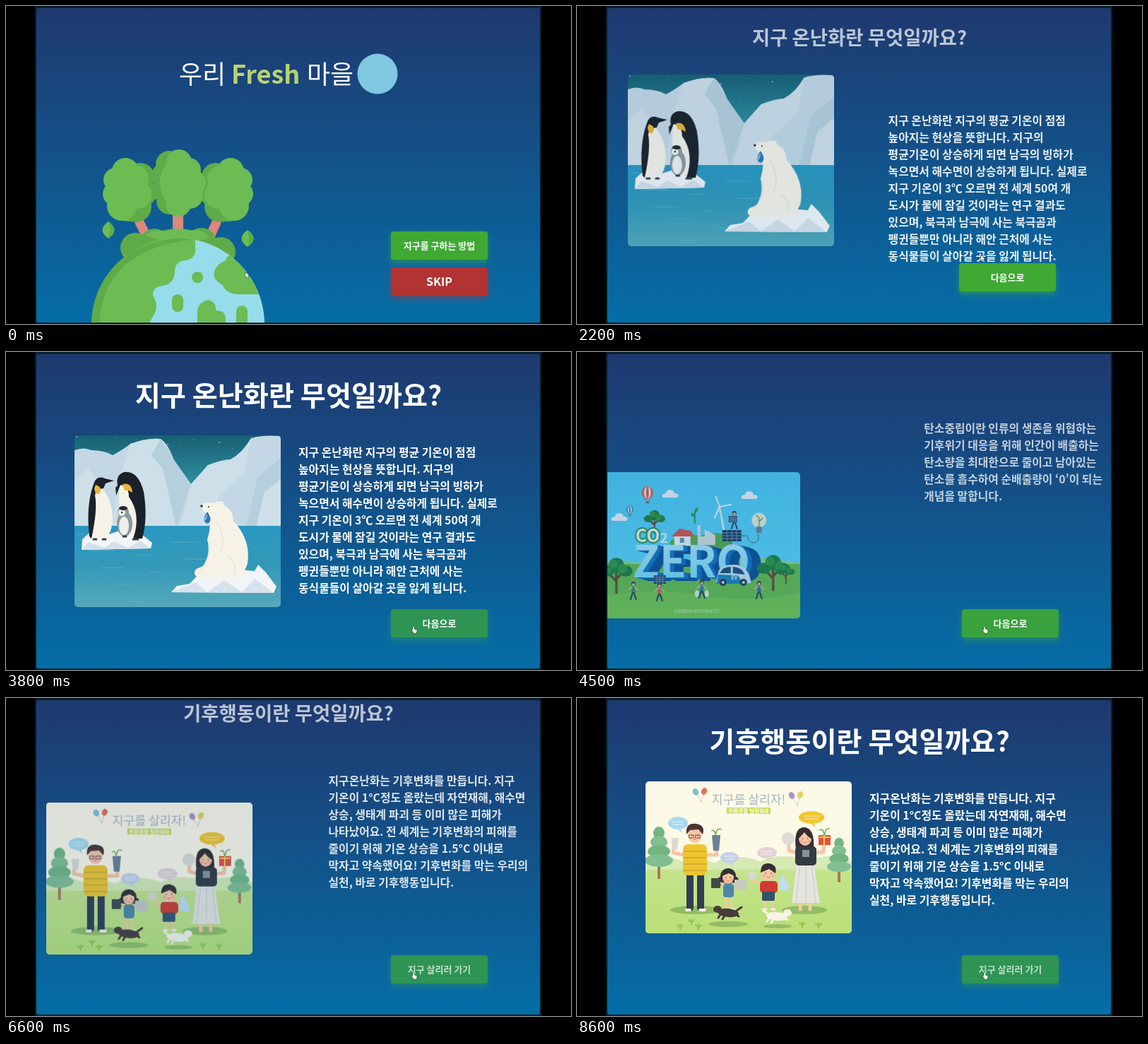
An HTML page with a canvas for the animation above (8.7 s loop, 800 by 450 pixels).

```html
<!DOCTYPE html>
<html lang="ko">
<head>
<meta charset="utf-8">
<title>지구 온난화 이야기</title>
<style>
html, body { margin: 0; width: 100%; height: 100%; overflow: hidden; background: #000; }
canvas { display: block; width: 800px; height: 450px; }
</style>
</head>
<body>
<canvas id="stage" width="800" height="450"></canvas>
<script>
const LOOP = 8700;
const FONT = '"Noto Sans CJK KR", "Noto Sans CJK", "Noto Sans", sans-serif';
const stage = document.getElementById('stage').getContext('2d');
let g = stage;

// Drawing helpers
function shape(color, d) { g.fillStyle = color; g.fill(new Path2D(d)); }
function line(color, width, d) {
  g.strokeStyle = color; g.lineWidth = width;
  g.lineCap = g.lineJoin = 'round';
  g.stroke(new Path2D(d));
}
function dot(color, x, y, rx, ry = rx, turn = 0) {
  g.fillStyle = color;
  g.beginPath(); g.ellipse(x, y, rx, ry, turn, 0, 7); g.fill();
}
function dots(color, list) { for (const d of list) dot(color, ...d); }
function box(color, x, y, w, h, r = 0) {
  g.fillStyle = color;
  g.beginPath(); g.roundRect(x, y, w, h, r); g.fill();
}
function text(str, x, y, size, color = '#fff', align = 'left', weight = 700) {
  g.font = `${weight} ${size}px ${FONT}`;
  g.textAlign = align; g.fillStyle = color;
  g.fillText(str, x, y);
}
function fade(y0, y1, ...colors) {
  const f = g.createLinearGradient(0, y0, 0, y1);
  colors.forEach((c, i) => f.addColorStop(i / (colors.length - 1), c));
  return f;
}

// Timing helpers
const clamp = v => Math.min(1, Math.max(0, v));
const mix = (a, b, k) => a + (b - a) * k;
function ease(p) {
  p = clamp(p);
  let lo = 0, hi = 1, u = p;
  for (let i = 0; i < 24; i++) {
    u = (lo + hi) / 2;
    if (0.75 * u * (1 - u) + u ** 3 < p) lo = u; else hi = u;
  }
  return 0.3 * u * (1 - u) ** 2 + 3 * u * u * (1 - u) + u ** 3;
}
const ramp = (t, start, length) => ease((t - start) / length);

// Home page
function crown(x, y, side) {
  const dark = '#5fab49', light = '#6cbc53';
  dots(dark, [[x + 16 * side, y - 19, 20], [x + 21 * side, y + 4, 18], [x + 10 * side, y + 23, 22], [x, y + 18, 26]]);
  dots(light, [[x - 5 * side, y - 27, 19], [x - 19 * side, y - 15, 17], [x - 20 * side, y + 5, 17],
    [x - 10 * side, y + 22, 21], [x + 10 * side, y - 17, 18], [x + 12 * side, y + 6, 20], [x - 3 * side, y, 26]]);
}
function leaf(x, y) {
  shape('#6cbc53', `M${x},${y - 12} Q${x + 17},${y} ${x},${y + 12} Q${x - 17},${y} ${x},${y - 12}Z`);
  shape('#5fab49', `M${x},${y - 12} Q${x + 17},${y} ${x},${y + 12} Q${x + 4},${y} ${x},${y - 12}Z`);
}
function planet() {
  line('#dd877d', 15, 'M243.500,298 V318');
  line('#dd877d', 13, 'M189,306 L200,328 M298,306 L288,328');
  crown(174, 261, 1);
  crown(313, 261, -1);
  dots('#5fab49', [[231, 224, 19], [224, 240, 18], [224, 260, 18], [232, 276, 19]]);
  dots('#6cbc53', [[245, 221, 18], [259, 232, 17], [265, 250, 18], [260, 268, 19], [244, 280, 18], [243, 250, 25, 34]]);
  dots('#5fab49', [[183, 342, 21], [210, 335, 20], [277, 335, 21], [304, 348, 21], [243, 338, 44, 23]]);
  shape('#6cbc53', 'M198,325 Q210,315 227,319 Q243,312 260,318 Q278,314 288,328 L243,340Z');
  g.save();
  g.beginPath(); g.arc(243.5, 451, 122.5, 0, 7); g.clip();
  box('#6cbc53', 120, 325, 248, 124);
  shape('#5fab49', 'M121,451 Q124,344 243,328 L264,331 Q138,344 132,451Z');
  shape('#97dcea', 'M268,328 V347 Q267,358 254,360 Q240,361 239,374 Q239,393 222,396 Q207,397 208,410 Q216,422 211,434 L202,450 H370 V328Z');
  shape('#6cbc53', 'M318,353 Q312,354 311,360 Q292,368 295,384 Q300,392 306,394 Q312,408 330,408 H370 V350Z');
  dot('#6cbc53', 271, 384, 8);
  box('#6cbc53', 235, 408, 16, 25, 8);
  shape('#6cbc53', 'M271,450 V430 Q274,418 286,416 Q298,418 297,431 Q310,430 311,442 V450Z');
  box('#6cbc53', 326, 424, 16, 34, 8);
  g.restore();
  leaf(145, 317);
  leaf(342, 329);
}
function home(t) {
  text('우리', 245, 110, 36, '#fff', 'left', 500);
  text('Fresh', 319, 110, 36, '#b9d36e', 'left', 900);
  text('마을', 426, 110, 36, '#fff', 'left', 500);
  dot('#80c8df', 526, 96, 28.5);
  planet();
  button('지구를 구하는 방법', 319, '#3fa934', mix(1, 0.55, ramp(t, 950, 200)));
  button('SKIP', 370, '#b13333', 1, { size: 16 });
}

// Picture: penguins and bear
function polar() {
  box(fade(118, 190, '#176074', '#2f919e'), 97, 118, 292, 130);
  for (let i = 0; i < 34; i++)
    dot('#8fc9cf', 100 + (i * 83) % 286, 120 + (i * 37) % 58, i % 5 ? 0.5 : 0.9);
  shape('#c3d8e4', 'M97,139 Q110,134 121,139 Q139,139 151,146 Q166,138 176,130 Q200,121 219,123 Q229,129 238,153 L262,187 L286,160 Q306,152 318,152 Q335,143 347,122 Q362,117 389,119 V248 H97Z');
  shape('#cddfe9', 'M176,130 Q200,121 219,123 L206,146 L222,165 L241,248 H150 L160,180Z M347,122 L338,170 L302,205 L286,248 H246 L262,187 L286,160 L318,152 Q335,143 347,122Z');
  shape('#b6cfdc', 'M219,123 L206,146 L222,165 L241,248 L262,187 L238,153Z M389,150 L356,177 L340,248 H389Z');
  shape('#d0e0e9', 'M97,184 L117,165 L137,190 L151,248 H97Z M389,180 L366,198 L354,248 H389Z');
  box(fade(246, 361, '#2a97c1', '#3499b8', '#56a9b9'), 97, 246, 292, 115);
  for (let i = 0; i < 17; i++) {
    const x = 100 + (i * 67) % 250, y = 257 + i * 6;
    line('#59b0c8', 0.8, `M${x},${y} h${12 + i * 13 % 28}`);
  }
  floe('M108,265 L120,254 L139,260 L161,253 L191,257 L207,270 L205,278 L107,280Z', 'M107,280 L117,269 L139,277 L153,268 L173,277 L190,267 L205,278Z');
  floe('M234,340 L242,331 L260,328 L275,312 L316,307 L352,310 L357,301 L368,312 L383,332 L379,341Z', 'M234,340 L269,326 L285,340 L309,323 L334,340 L352,321 L379,341Z');
  penguins();
  shape('#f6f2e7', 'M276,218 Q282,211 292,214 Q302,209 309,217 Q321,223 322,239 Q347,266 342,299 Q338,318 308,319 L274,319 Q263,316 269,308 L280,302 Q290,285 285,265 Q291,247 287,231 L279,225Z');
  dots('#f6f2e7', [[304, 215, 4], [276, 312, 9, 7], [320, 312, 21, 8]]);
  line('#e0dbd0', 1, 'M298,240 Q313,264 304,283 M289,269 Q290,291 275,309 M313,289 Q327,293 324,313');
  dots('#252d33', [[277, 218, 1.7], [287, 219, 1]]);
  shape('#2e76b5', 'M285,226 Q294,239 285,243 Q276,239 285,226Z');
  shape('#7db9df', 'M285,229 Q285,238 281,239 Q279,237 285,229Z');
}
function floe(top, shade) {
  shape('#f1f4f8', top);
  shape('#d6e2eb', shade);
}
function penguins() {
  shape('#f5f2e8', 'M130,187 Q149,203 151,232 Q151,258 139,264 L121,264 Q112,235 130,187Z');
  shape('#1b2128', 'M124,187 Q128,174 140,179 L153,182 L141,186 L138,193 Q127,193 126,203 Q130,222 121,264 L118,261 Q113,217 124,187Z');
  shape('#e9b536', 'M127,188 Q138,192 132,200 Q127,204 125,193Z');
  shape('#f5f2e8', 'M161,187 Q158,218 165,259 L182,263 Q192,233 181,197Z');
  shape('#1b2128', 'M158,189 Q155,174 167,170 Q187,167 195,198 Q201,235 193,264 L180,264 Q192,230 174,205 Q174,190 162,188 L156,203 L155,192Z');
  shape('#e9b536', 'M165,187 Q178,184 179,199 Q172,194 168,196Z');
  dots('#8d979e', [[168, 243, 11, 18], [166, 226, 8, 7]]);
  dots('#eef0ec', [[167, 246, 7, 13], [164, 227, 5]]);
  dots('#20282e', [[166, 221, 6, 3], [164, 227, 1.2]]);
  line('#3a4248', 3, 'M124,265 h4 M137,265 h4 M166,261 h4 M180,265 h7');
}

// Picture: city without carbon
function cloud(x, y) {
  dots('#fff', [[x - 6, y + 1, 5, 3], [x, y - 2, 6, 5], [x + 7, y + 1, 5, 3]]);
  box('#fff', x - 11, y, 22, 4, 2);
}
function tree(x, y, s) {
  line('#6d4629', 3 * s, `M${x},${y} v${28 * s} M${x},${y + 13 * s} l${-9 * s},${-9 * s} M${x},${y + 10 * s} l${8 * s},${-8 * s}`);
  dots('#23803a', [[x, y - 7 * s, 10 * s], [x - 12 * s, y, 9 * s, 7 * s], [x + 12 * s, y, 9 * s, 7 * s]]);
  dots('#359a3c', [[x - 4 * s, y - 9 * s, 6 * s], [x + 8 * s, y - 3 * s, 6 * s]]);
}
function balloon(x, y, r, color) {
  dot(color, x, y, r, r * 1.15);
  dot('#fff', x, y, r * 0.6, r * 1.1);
  dot(color, x, y, r * 0.25, r * 1.15);
  line('#7c6653', 0.6, `M${x - r * .5},${y + r} l${r * .3},${r * .6} M${x + r * .5},${y + r} l${-r * .3},${r * .6}`);
  box('#9b6548', x - r * .25, y + r * 1.5, r * .5, r * .4);
}
function walker(x, y, shirt) {
  dot('#36313a', x, y - 11, 3);
  dot('#f3bd98', x, y - 10, 2);
  line(shirt, 5, `M${x},${y - 5} v5`);
  line('#f3bd98', 1.5, `M${x - 2},${y - 6} l-5,3 M${x + 2},${y - 6} l5,4`);
  line('#27344a', 2, `M${x - 1},${y + 2} l-3,9 M${x + 1},${y + 2} l3,9`);
}
function panel(x, y, w, h) {
  box('#1f3d5c', x, y, w, h);
  for (let i = 1; i < 4; i++)
    line('#a7cee2', 0.6, `M${x + w * i / 4},${y} v${h} M${x},${y + h * i / 4} h${w}`);
}
function city() {
  box(fade(118, 248, '#50d5ff', '#62dcff'), 97, 118, 292, 207);
  shape('#8fdc9c', 'M97,249 L126,241 L160,246 L190,236 L240,244 L316,236 L389,246 V280 H97Z');
  box('#6ec042', 97, 248, 292, 77);
  shape('#7ccb45', 'M97,297 Q160,280 244,292 T389,288 V325 H97Z');
  cloud(205, 150); cloud(317, 152); cloud(133, 183);
  balloon(173, 147, 8, '#ef5b43');
  balloon(148, 171, 5, '#368cba');
  tree(183, 184, 0.72);
  line('#f5fafa', 2.5, 'M275,167 L282,205');
  line('#fff', 2, 'M275,167 L270,153 M275,167 L291,164 M275,167 L268,183');
  dots('#5cb247', [[235, 218, 30, 11], [268, 217, 25, 13]]);
  shape('#e4eae7', 'M244,221 V193 h4 v16 h6 v-10 l15,8 v14Z');
  line('#37963f', 2, 'M240,190 V176');
  dots('#37963f', [[242, 172, 2, 4, .4], [238, 179, 2, 4, -.7]]);
  box('#fff', 211, 208, 23, 14);
  shape('#e65642', 'M207,209 L218,198 L234,201 L240,209Z');
  box('#6e9ab1', 219, 211, 6, 7);
  panel(279, 200, 27, 16);
  line('#466578', 1, 'M292,216 v6 M306,208 h8 q2,10 10,10 q8,0 6,-12');
  walker(296, 187, '#3c78ba');
  panel(288, 180, 12, 9);
  dot('#fbf9d9', 331, 186, 10);
  line('#fff', 1, 'M331,176 a10,10 0 1,1 -.1,0');
  line('#61ad56', 1.5, 'M331,195 V183 l-4,-4 M331,188 l5,-5');
  box('#75868d', 327, 195, 8, 9, 2);
  for (let i = 16; i > 0; i--) text('ZERO', 152 + i * 1.2, 267 + i * .3, 62, i > 5 ? '#0f4f94' : '#1574c4', 'left', 900);
  text('ZERO', 152, 267, 62, fade(222, 268, '#b9f1ff', '#84e4ff'), 'left', 900);
  g.font = `900 25px ${FONT}`;
  g.textAlign = 'left'; g.strokeStyle = '#2f9a3f'; g.lineWidth = 4;
  g.strokeText('CO', 156, 217);
  text('CO', 156, 217, 25, '#fff', 'left', 900);
  text('2', 191, 218, 18, '#fff', 'left', 900);
  tree(129, 258, 1.1); tree(351, 254, 1.1);
  tree(113, 259, .6); tree(369, 259, .6);
  shape('#d8eef5', 'M270,273 L274,257 Q279,248 299,249 Q311,251 317,263 L320,274 L314,276 H272Z');
  shape('#1f4f78', 'M277,259 Q279,252 291,252 V261 H275Z M294,252 Q306,252 311,263 L294,261Z');
  shape('#2383bd', 'M273,263 L301,264 L309,276 H271Z');
  dots('#263748', [[280, 274, 5], [309, 274, 5]]);
  dots('#dcebef', [[280, 274, 2], [309, 274, 2]]);
  text('EV', 296, 270, 7, '#fff', 'center');
  walker(153, 287, '#3a8c58'); walker(190, 289, '#e35f4b');
  walker(250, 285, '#337eac'); walker(331, 286, '#4a6b9e');
  panel(182, 264, 17, 12);
  dots('#edf5ec', [[243, 290, 3, 5], [257, 290, 3, 5]]);
  text('CARBON NEUTRALITY', 243, 317, 6.3, '#e8f6cc', 'center', 400);
}

// Picture: family
function pine(x, y, s) {
  box('#a77c59', x - 2, y + 26 * s, 4, 23 * s);
  for (let i = 0; i < 4; i++) dot(i % 2 ? '#80bf91' : '#72b583', x, y + i * 13 * s - 16 * s, (8 + i * 4) * s, 9 * s);
}
function bubble(x, y, rx, ry, color) {
  dot(color, x, y, rx, ry);
  shape(color, `M${x - 3},${y + ry - 2} l6,0 l3,7Z`);
  line('#ffffffaa', 1, `M${x - rx * .6},${y - 2} h${rx * 1.2} M${x - rx * .5},${y + 2} h${rx}`);
}
function face(x, y, r) {
  dot('#f7c6a5', x, y, r, r * 1.1);
  dots('#4b3c3c', [[x - r * .4, y, .8], [x + r * .4, y, .8]]);
  dots('#f0a28e', [[x - r * .6, y + r * .4, 1.5], [x + r * .6, y + r * .4, 1.5]]);
  line('#bd5c50', .7, `M${x - 2},${y + r * .55} q2,2 4,0`);
}
function dog(x, y, color, dir) {
  line(color, 3, `M${x - 9},${y} l-5,7 M${x + 8},${y} l7,5 M${x - 4},${y + 2} l-4,7 M${x - 12 * dir},${y - 3} l${-7 * dir},-5`);
  dot(color, x, y, 15, 6, .1);
  dot(color, x + 15 * dir, y - 5, 6, 5);
}
function party(x, y, left, right) {
  line('#a9a592', .5, `M${x},${y} l8,14 M${x + 12},${y} l-4,14`);
  dot(left, x, y, 4, 5, -.5);
  dot(right, x + 12, y - 1, 4, 5, .4);
}
function family() {
  box('#fdf9e7', 97, 118, 292, 215);
  dots('#d6eab4', [[123, 244, 35, 19], [171, 244, 36, 15], [229, 243, 40, 18], [293, 243, 42, 19], [358, 244, 40, 20]]);
  box(fade(243, 333, '#c4e48c', '#b9df78'), 97, 243, 292, 90);
  pine(116, 207, 1); pine(371, 219, .85);
  party(168, 133, '#7ac1cf', '#e5705f'); party(304, 138, '#a795c8', '#e6cf57');
  text('지구를 살리자!', 243, 150, 17.2, '#a7b5c1', 'center', 500);
  box('#c9db57', 212, 155, 62, 9);
  text('친환경을 실천하자', 243, 163, 7.5, '#fff', 'center');
  bubble(143, 177, 14, 9, '#a8d9ee'); bubble(332, 169, 18, 9, '#f2c62f');
  bubble(216, 226, 13, 8, '#c5cfe7'); bubble(269, 219, 14, 8, '#e3d1d4');
  dots('#93bd64', [[168, 300, 36, 6], [322, 300, 32, 6], [214, 320, 28, 4], [284, 323, 20, 3]]);

  line('#f7c6a5', 5, 'M151,222 L136,219 L138,206 M182,222 L198,222 L197,207');
  line('#323d50', 10, 'M160,248 V297 M175,248 V297');
  line('#f5f1df', 4, 'M155,300 h5 M174,300 h7');
  box('#efc52f', 150, 207, 34, 44, 7);
  line('#ba9832', 1, 'M151,217 h32 M151,226 h32 M151,235 h32 M151,244 h32');
  face(167, 194, 10);
  shape('#493536', 'M155,193 Q153,176 169,178 Q182,180 178,193 L172,186 L160,187Z');
  line('#4b4142', .8, 'M159,194 h6 v4 h-6Z M168,194 h6 v4 h-6Z');
  shape('#dcdad3', 'M133,198 h11 l-2,16 h-7Z');
  shape('#6b8096', 'M191,194 h12 l-2,22 h-8Z');
  line('#69aa5c', 1.5, 'M196,194 q-1,-9 -5,-6 M197,192 q1,-9 7,-6');

  shape('#352d32', 'M310,214 Q306,184 321,183 Q337,183 335,214Z');
  line('#f7c6a5', 5, 'M311,219 L300,216 L300,203 M337,219 L349,218 L350,204 M316,280 V299 M330,280 V299');
  shape('#e5e4df', 'M311,233 H335 L344,290 H304Z');
  line('#c5c5c0', .8, 'M316,235 L310,289 M324,235 V289 M332,235 L338,289');
  box('#343b42', 309, 210, 30, 27, 5);
  box('#86949a', 319, 215, 10, 10);
  face(323, 199, 9);
  shape('#352d32', 'M313,200 Q312,187 324,187 Q334,188 333,200 Q325,195 322,190Z');
  dot('#ddddd5', 299, 199, 9);
  box('#df513f', 342, 194, 17, 14);
  line('#f4ce53', 2, 'M344,197 h13 M350,194 v14');
  line('#69aa5c', 1.5, 'M350,194 q-1,-10 -6,-7 M351,192 q1,-8 6,-7');

  dots('#343035', [[214, 252, 11, 11], [203, 259, 4, 6], [225, 259, 4, 6]]);
  line('#f7c6a5', 3, 'M208,264 L198,260 M220,264 L231,261 M211,280 V297 M218,280 V297');
  box('#4b87a5', 207, 263, 15, 19, 4);
  face(214, 254, 8);
  shape('#343035', 'M205,252 Q207,241 215,242 Q224,244 223,252 L215,248Z');
  line('#f7c6a5', 3, 'M260,263 L248,258 M281,262 L292,257 M266,279 V297 M276,279 V297');
  box('#d03a30', 259, 259, 25, 17, 5);
  box('#33536c', 262, 274, 18, 13, 2);
  face(271, 248, 10);
  shape('#353034', 'M260,247 Q260,233 272,234 Q284,236 281,248 L272,242Z');
  line('#f4f2e6', 3, 'M210,299 h3 M218,299 h4 M264,299 h4 M276,299 h4');
  box('#41494c', 190, 255, 13, 14, 1);
  box('#c6c8c2', 223, 257, 17, 15, 1);
  shape('#c0ddec', 'M291,248 L301,267 Q302,274 288,272 Q282,267 291,248Z');
  dot('#d9d8d2', 248, 251, 6);
  dog(214, 304, '#493b3a', -1); dog(283, 309, '#f7f3e7', 1);
  for (const [x, y] of [[146, 322], [162, 315], [172, 322], [319, 319], [342, 320]])
    line('#96c452', 2, `M${x},${y + 6} v-8 M${x},${y + 3} l-4,-4 M${x},${y + 3} l4,-4`);
}

function picture(h, paint) {
  const c = document.createElement('canvas');
  c.width = 292; c.height = h;
  g = c.getContext('2d');
  g.beginPath(); g.roundRect(0, 0, 292, h, 5); g.clip();
  g.translate(-97, -118);
  paint();
  g = stage;
  return c;
}

// Pages
const pages = [
  { start: 1555, from: -1, title: '지구 온난화란 무엇일까요?', label: '다음으로', art: picture(243, polar),
    ink: 1, hover: t => mix(1, 0.7, ramp(t, 3100, 200)),
    lines: ['지구 온난화란 지구의 평균 기온이 점점', '높아지는 현상을 뜻합니다. 지구의', '평균기온이 상승하게 되면 남극의 빙하가',
      '녹으면서 해수면이 상승하게 됩니다. 실제로', '지구 기온이 3℃ 오르면 전 세계 50여 개', '도시가 물에 잠길 것이라는 연구 결과도',
      '있으며, 북극과 남극에 사는 북극곰과', '펭귄들뿐만 아니라 해안 근처에 사는', '동식물들이 살아갈 곳을 잃게 됩니다.'] },
  { start: 4050, from: 1, title: '탄소중립이란 무엇일까요?', label: '다음으로', art: picture(207, city),
    ink: 1, hover: () => 0.9,
    lines: ['탄소중립이란 인류의 생존을 위협하는', '기후위기 대응을 위해 인간이 배출하는', '탄소량을 최대한으로 줄이고 남아있는',
      '탄소를 흡수하여 순배출량이 ‘0’이 되는', '개념을 말합니다.'] },
  { start: 6033, from: 1, title: '기후행동이란 무엇일까요?', label: '지구 살리러 가기', art: picture(215, family),
    ink: 0.7, hover: () => 0.7,
    lines: ['지구온난화는 기후변화를 만듭니다. 지구', '기온이 1°C정도 올랐는데 자연재해, 해수면', '상승, 생태계 파괴 등 이미 많은 피해가',
      '나타났어요. 전 세계는 기후변화의 피해를', '줄이기 위해 기온 상승을 1.5°C 이내로', '막자고 약속했어요! 기후변화를 막는 우리의', '실천, 바로 기후행동입니다.'] }
];

function button(label, y, color, alpha, { x = 545, size = 13, ink = alpha } = {}) {
  g.save();
  g.globalAlpha = alpha;
  // The glow stays outside the face, which may be translucent.
  g.save();
  g.beginPath(); g.rect(x - 30, y - 30, 197, 100); g.roundRect(x, y, 137, 40, 4);
  g.clip('evenodd');
  g.shadowColor = color + '90'; g.shadowBlur = 9; g.shadowOffsetY = 4;
  box(color, x, y, 137, 40, 4);
  g.restore();
  box(color, x, y, 137, 40, 4);
  g.globalAlpha = ink;
  text(label, x + 68.5, y + 20 + size * .37, size, '#fff', 'center');
  g.restore();
}
function bounce(p) {
  const keys = [[0, 1800], [.6, -15], [.75, 6], [.9, -3], [1, 0]];
  const i = keys.findIndex(k => p < k[0]);
  if (i < 1) return 0;
  const [a, from] = keys[i - 1], [b, to] = keys[i];
  return mix(from, to, ease((p - a) / (b - a)));
}
function drawPage(page, t) {
  const p = (t - page.start) / 1000, left = 1 - ease(p);
  const scale = mix(.7, 1, ease((p - .8) / .2));
  g.save();
  g.globalAlpha = scale;
  g.translate(400, 61 - 715 * (1 - ease(p / .8)));
  g.scale(scale, scale);
  text(page.title, 0, 14.5, 39.2, '#fff', 'center');
  g.restore();

  g.save();
  g.globalAlpha = 1 - left;
  g.drawImage(page.art, 97 - 292 * left, 118 + page.art.height * left * page.from);
  const height = page.lines.length * 24 + 14;
  page.lines.forEach((s, i) => text(s, 414 + 308 * left, 148 + i * 24 - height * left * page.from, 15.85));
  g.restore();
  const x = 545 + (page === pages[0] ? bounce(p) : 0);
  button(page.label, 364, '#3fa934', page.hover(t), { x, ink: page.ink });
}

function pointer(t) {
  const a = ramp(t, 200, 800), b = ramp(t, 2600, 600);
  const x = mix(mix(340, 573, a), 576, b), y = mix(mix(377, 353, a), 389, b);
  const hand = t > 920 && t < 1555 || t > 3000;
  g.save();
  g.translate(x, y);
  const d = hand ? 'M0,0 q1,-1 1.500,0 l.5,3 l3,1 q1,.5 .7,2 l-1,3 h-3 l-3,-4 q0,-1 1.500,-.5Z'
                 : 'M-1,0 V7 L1,5.500 L2.500,8 L3.500,7.500 L2.500,5 H4.500Z';
  line('#1c2b32', 1, d);
  shape('#fff', d);
  g.restore();
}

function draw(t) {
  box('#000', 0, 0, 800, 450);
  box('#08202d', 41, 0, 717, 450);
  g.save();
  g.beginPath(); g.roundRect(43, 3, 713, 445, 3); g.clip();
  box(fade(3, 448, '#1f396f', '#056da6'), 43, 3, 713, 445);
  const page = pages.filter(p => t >= p.start).pop();
  if (page) drawPage(page, t); else home(t);
  g.restore();
  pointer(t);
}
function tick() {
  draw(performance.now() % LOOP);
  requestAnimationFrame(tick);
}
tick();
</script>
</body>
</html>
```
